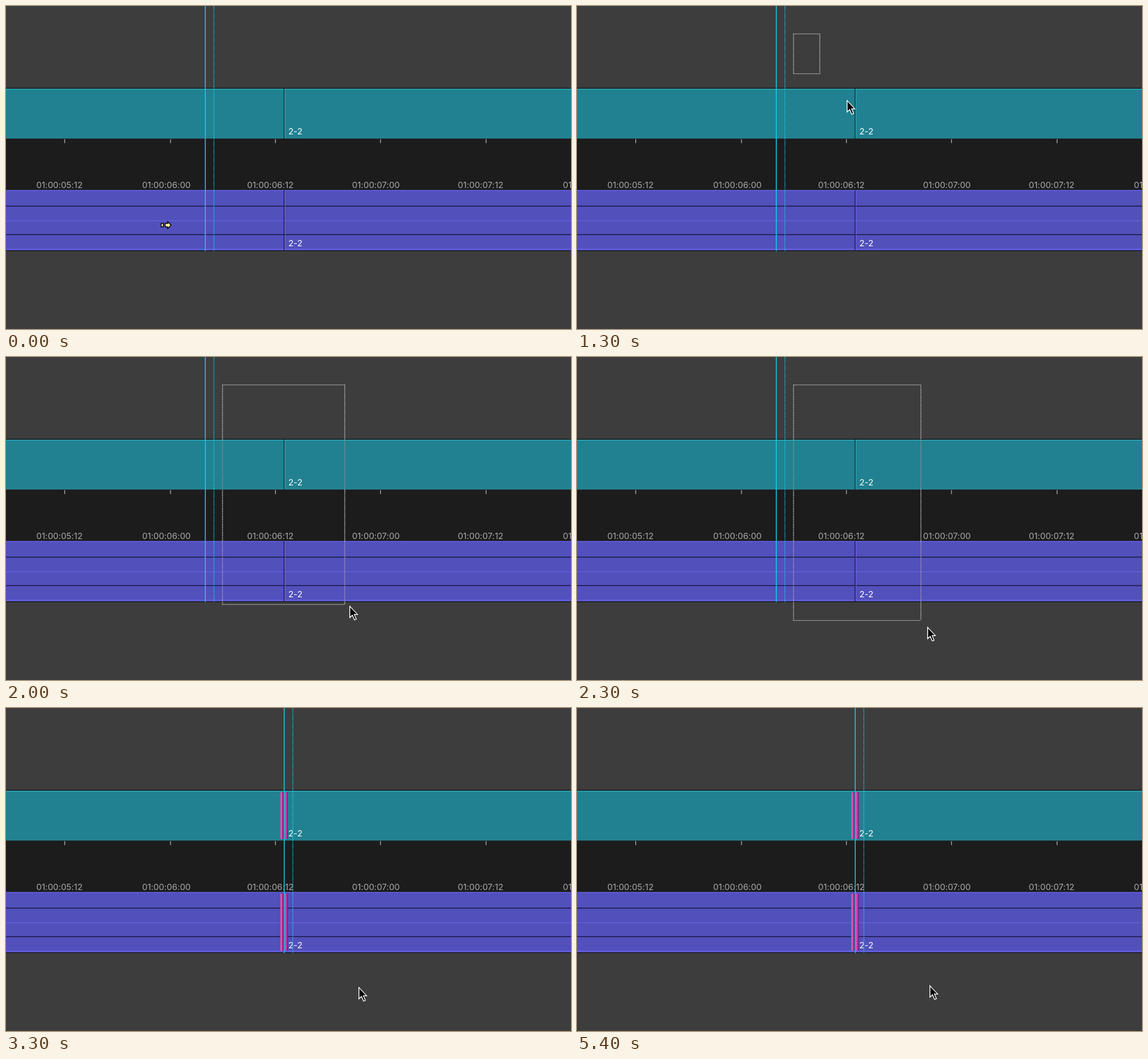
These frames come from a looping animation (989x566 px, 5.5 s). An HTML page:

```html
<!DOCTYPE html>
<html lang="en">
<head>
<meta charset="utf-8">
<title>Timeline lasso</title>
<style>
  html, body { margin: 0; width: 100%; height: 100%; overflow: hidden; background: #3d3d3d; }
  svg { display: block; }
  text { font: 15px Inter, "Liberation Sans", sans-serif; font-feature-settings: "calt" 0; }
  .label { fill: #a9a9a9; }
  .name { fill: #fff; }
  .dots { stroke-dasharray: 1.4 1.4; fill: none; }
</style>
</head>
<body>
<svg width="989" height="566" viewBox="0 0 989 566">
  <defs>
    <linearGradient id="lasso" gradientUnits="userSpaceOnUse" x1="0" y1="0" x2="0" y2="566"></linearGradient>
    <linearGradient id="rollA">
      <stop offset="0" stop-color="#a8559f"/>
      <stop offset=".35" stop-color="#e45fb9"/>
      <stop offset=".7" stop-color="#b32b94"/>
      <stop offset="1" stop-color="#5f1c5c"/>
    </linearGradient>
    <linearGradient id="rollB">
      <stop offset="0" stop-color="#b53fb5"/>
      <stop offset=".4" stop-color="#e04bc4"/>
      <stop offset=".75" stop-color="#a8268f"/>
      <stop offset="1" stop-color="#4f1c54"/>
    </linearGradient>
  </defs>

  <rect width="989" height="566" fill="#3d3d3d"/>
  <g id="tracks"></g>
  <g id="rollers">
    <rect x="480" y="147.5" width="5.6" height="82" fill="url(#rollA)"/>
    <rect x="487.5" y="147.5" width="5.6" height="82" fill="url(#rollB)"/>
    <rect x="480" y="325.5" width="5.6" height="100" fill="url(#rollA)"/>
    <rect x="487.5" y="325.5" width="5.6" height="100" fill="url(#rollB)"/>
  </g>
  <g id="texts"></g>
  <path id="box" class="dots" stroke="url(#lasso)" stroke-width="1.4"/>
  <g id="playhead" stroke="#18c8e8" stroke-width="1.6">
    <path d="M348.8 0V429.5"/>
    <path class="dots" d="M363.9 0V429.5"/>
  </g>
  <g id="arrow">
    <path fill="#fff" d="M0 0V23.2L5.1 18.7L8.6 26.6L13 24.7L9.7 17H15.8Z"/>
    <path fill="#000" d="M1.5 3.5V19.9L5.6 16.3L9.3 24.7L11.2 23.9L7.6 15.5H12.9Z"/>
  </g>
  <g id="segment" fill="#fff3a6" stroke="#000" stroke-width="1.5">
    <path d="M-8.4 -3H-4.6V3H-8.4Z"/>
    <path d="M-1.4 -3H3V-6L9 0L3 6V3H-1.4Z"/>
  </g>
</svg>
<script>
const NS = "http://www.w3.org/2000/svg";
const $ = id => document.getElementById(id);

function add(parent, tag, attrs, text) {
  const el = document.createElementNS(NS, tag);
  for (const k in attrs) el.setAttribute(k, attrs[k]);
  if (text) el.textContent = text;
  parent.appendChild(el);
  return el;
}
const bar = (x, y, width, height, fill) => add($("tracks"), "rect", { x, y, width, height, fill });
const row = (y, h, fill) => bar(0, y, 989, h, fill);

// Video track, ruler, audio tracks
row(143.4, 1.8, "#1b1b1b");
row(145, 87, "#218190");
row(145, 1.3, "#2cb3c1");
row(232, 91, "#1c1c1c");
row(231.3, .9, "#2a8d9a");
row(322.6, 106, "#5250bb");
row(322.6, 1.5, "#6562e4");
row(349.9, 1.5, "#19163f");
row(375.7, 1.3, "#6562de");
row(399.8, 1.5, "#19163f");
row(425.3, 1.9, "#6562e4");
row(428, 1.6, "#1e1d26");
bar(486.1, 145, 1.5, 87, "#13282c");
bar(487.7, 145, 1.1, 87, "#2cb3c1");
bar(486.1, 323, 1.5, 105, "#19163f");
bar(487.7, 323, 1.1, 105, "#6f6cf0");
[102.7, 287.9, 471.6, 655.5, 840.4].forEach(x => bar(x - .7, 233.3, 1.4, 7, "#a9a9a9"));

const labels = [[53, "05:12"], [238.2, "06:00"], [422, "06:12"], [605.8, "07:00"], [790.8, "07:12"], [974.8, "08:00"]];
labels.forEach(([x, s]) => add($("texts"), "text", { x, y: 319, class: "label" }, "01:00:" + s));
[225, 421].forEach(y => add($("texts"), "text", { x: 494.2, y, class: "name" }, "2-2"));

// The lasso is tinted where it crosses the clips
const tints = [[0, 145, "#e4e4e4"], [145, 232, "#a89890"], [232, 323, "#fff"], [323, 428, "#b9b2b8"], [428, 566, "#e4e4e4"]];
for (const [from, to, color] of tints)
  for (const y of [from, to]) add($("lasso"), "stop", { offset: y / 566, "stop-color": color });

// Pointer path: time, x, y
const path = [
  [0, 280, 384], [100, 290, 362], [200, 325, 278], [300, 364, 160], [400, 387, 72], [500, 391, 45],
  [800, 391, 45], [1000, 387, 47], [1100, 402, 78], [1200, 433, 118], [1300, 472, 164],
  [1400, 505, 225], [1600, 558, 330], [1800, 591, 406], [1900, 601, 433], [2000, 601, 435],
  [2200, 610, 461], [2400, 616, 483], [2500, 617, 488], [5200, 617, 488], [5400, 617, 485]
];
const LOOP = 5500, STEP = 100, DRAG = 1100, DROP = 3300;

function pointer(t) {
  let i = 0;
  while (i < path.length - 2 && path[i + 1][0] <= t) i++;
  const [t0, x0, y0] = path[i], [t1, x1, y1] = path[i + 1];
  const k = Math.min(1, (t - t0) / (t1 - t0));
  return [x0 + (x1 - x0) * k, y0 + (y1 - y0) * k];
}

const show = (id, on) => $(id).setAttribute("visibility", on ? "visible" : "hidden");

function draw(time) {
  const t = Math.floor((time % LOOP) / STEP) * STEP;
  const [x, y] = pointer(t);
  const overClip = (y > 145 && y < 232) || (y > 323 && y < 428);
  const segment = t < 500 && overClip;
  show("segment", segment);
  show("arrow", !segment);
  $(segment ? "segment" : "arrow").setAttribute("transform", `translate(${x} ${y})`);

  // The box trails the pointer by one step
  const [bx, by] = pointer(t - STEP);
  show("box", t > DRAG && t < DROP);
  $("box").setAttribute("d", `M379 48.9H${bx - 8}V${by + .6}M379 48.9V${by + .6}H${bx - 8}`);

  const trimming = t >= DROP;
  show("rollers", trimming);
  $("playhead").setAttribute("transform", `translate(${trimming ? 138.2 : 0} 0)`);
}

const start = performance.now();
function tick() {
  draw(performance.now() - start);
  requestAnimationFrame(tick);
}
tick();
</script>
</body>
</html>
```
